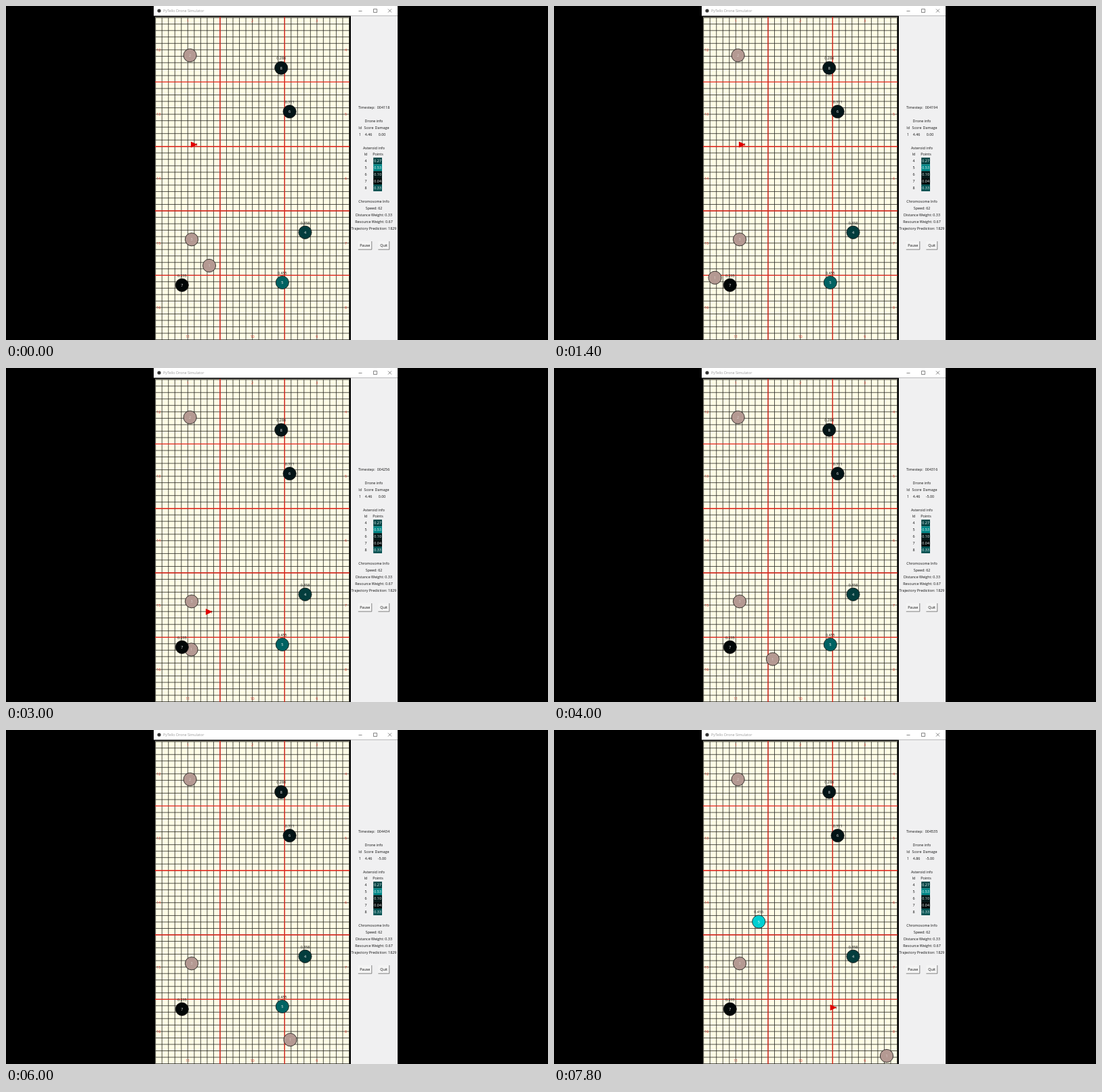
Write an HTML page that moves like this. It is 800 px wide and 494 px high and loops after 8000 ms.

```html
<!DOCTYPE html>
<html lang="en">
<head>
<meta charset="utf-8">
<title>Drone Simulator</title>
<style>
  html, body { margin: 0; width: 100%; height: 100%; overflow: hidden; background: #000; }
  svg { display: block; width: 100vw; height: 100vh; }
  text { font: 5.4px "Open Sans", "Noto Sans", sans-serif; }
</style>
</head>
<body>
<svg id="stage" viewBox="0 0 800 494"></svg>
<script>
const stage = document.getElementById('stage');
const LOOP = 8000, TICK = 200;
const LEFT = 220.7, TOP = 17.2, TILE = 95.27, CELL = TILE / 10;

function add(tag, attrs, parent = stage) {
  const el = document.createElementNS('http://www.w3.org/2000/svg', tag);
  for (const key in attrs) el.setAttribute(key, attrs[key]);
  parent.appendChild(el);
  return el;
}
const rect = (x, y, width, height, fill) => add('rect', { x, y, width, height, fill });
const path = (d, stroke, width) => add('path', { d, stroke, 'stroke-width': width, fill: 'none' });
function label(str, x, y, fill = '#111', anchor = 'middle', parent = stage) {
  const el = add('text', { x, y: y + 2, fill, 'text-anchor': anchor }, parent);
  el.textContent = str;
  return el;
}
const place = (el, x, y) => el.setAttribute('transform', `translate(${x.toFixed(2)} ${y.toFixed(2)})`);

// Window frame
rect(0, 0, 800, 494, '#000');
rect(218, 0, 360, 14.5, '#fff');
rect(509, 14.5, 69, 480, '#f0f0f1');
add('circle', { cx: 226, cy: 7, r: 2.6, fill: '#333' });
label('PyTello Drone Simulator', 232, 7, '#999', 'start');
path('M520.5 7.5h5M542.5 4.5h5v5h-5zM564 4.5l5 5m0-5l-5 5', '#555', 0.7);

// Board
rect(220.2, 16.4, 286.8, 478, '#fffde6');
function gridLines(step, cols, rows) {
  let d = '';
  for (let i = 0; i <= cols; i++) d += `M${LEFT + i * step} ${TOP}V494`;
  for (let j = 0; j <= rows; j++) d += `M${LEFT} ${TOP + j * step}H506.8`;
  return d;
}
path(gridLines(CELL, 30, 50), '#24241f', 0.8);
let red = '';
for (const i of [1, 2]) red += `M${LEFT + i * TILE} 16V494`;
for (const j of [1, 2, 3, 4]) red += `M220 ${TOP + j * TILE}H507`;
path(red, '#e8261c', 1.3);

const RED = '#e63c32';
for (let i = 0; i < 3; i++) {
  const x = LEFT + (i + 0.5) * TILE;
  label(1 + i, x, 22, RED);
  label(11 - i, x, 489, RED);
}
for (let j = 0; j < 5; j++) {
  const y = TOP + (j + 0.5) * TILE;
  label(12 + j, 225.3, y, RED);
  label(4 + j, 501.5, y, RED);
}

// Asteroids
function asteroid(id, x, y, fill, value) {
  const g = add('g', {});
  const disc = add('circle', { r: 9.6, fill, stroke: '#111', 'stroke-width': 0.8 }, g);
  label(id, 0, 0, value ? '#fff' : '#ddd0cc', 'middle', g);
  if (value) label(value, 0, -14.3, '#111', 'middle', g);
  place(g, x, y);
  return { g, disc };
}
const ROCK = '#b49992';
const rover = asteroid(1, 300, 384, ROCK);
asteroid(2, 271.6, 73, ROCK);
asteroid(3, 274, 345.3, ROCK);
asteroid(4, 441.5, 334.8, '#033d3d', '0.358');
const prize = asteroid(5, 407.8, 409, '#006262', '0.455');
asteroid(6, 418.6, 156.2, '#021416', '0.311');
asteroid(7, 259.8, 412.8, '#020707', '0.235');
asteroid(8, 406.2, 91.6, '#021416', '0.288');

// Drone
const drone = add('g', {});
add('path', { d: 'M-4.4-4.6L5.4 0L-4.4 4.6z', fill: '#e00000' }, drone);
label('1', 4.2, 0, '#300', 'middle', drone);

// Side panel
label('Timestep:', 520, 150.2, '#111', 'start');
const stepText = label('', 557, 150.2);
label('Drone info', 543, 170);
label('Id', 522.7, 180);
label('Score', 535.5, 180);
label('Damage', 555, 180);
label('1', 522.5, 189.8);
const scoreText = label('', 535, 189.8);
const damageText = label('', 555, 189.8);
label('Asteroid info', 543, 209.5);
label('Id', 531, 219.4);
label('Points', 549, 219.4);
[['0.27', '#044444'], ['0.53', '#008787'], ['0.10', '#001919'],
 ['0.04', '#000a0a'], ['0.33', '#045454']].forEach(([points, fill], i) => {
  const y = 229.3 + i * 9.93;
  label(4 + i, 531, y);
  rect(542.2, y - 5, 12.8, 10, fill);
  label(points, 548.7, y, '#fff');
});
['Chromosome Info', 'Speed: 62', 'Distance Weight: 0.33', 'Resource Weight: 0.67',
 'Trajectory Prediction: 1829'].forEach((line, i) => label(line, 543, 289 + i * 9.93));

function button(str, x, width) {
  rect(x, 348, width, 12.3, '#f4f4f4');
  path(`M${x} 360.2h${width}v-12.2`, '#666', 0.8);
  label(str, x + width / 2, 354);
}
button('Pause', 519.8, 20);
button('Quit', 549.4, 16.4);

// Motion
const COUNTER = [[0, 4118], [1400, 4194], [3000, 4256], [4000, 4316],
                 [5200, 4388], [6800, 4479], [7800, 4535]];
function stepAt(t) {
  let i = 1;
  while (t > COUNTER[i][0]) i++;
  const [t0, s0] = COUNTER[i - 1], [t1, s1] = COUNTER[i];
  return s0 + (s1 - s0) * (t - t0) / (t1 - t0);
}

// Reflects a travelled distance between two walls.
function bounce(dist, lo, hi) {
  const span = hi - lo, d = ((dist % (2 * span)) + 2 * span) % (2 * span);
  return lo + (d < span ? d : 2 * span - d);
}

const LAUNCH = 1800, CRASH = 3600, MINED = 7000;
function draw(t) {
  const step = stepAt(t), travelled = step - 4118;
  place(rover.g, bounce(0.8225 * travelled - 70, 230, 497), 384 + 0.235 * travelled);

  const mined = t >= MINED;
  const flight = Math.max(0, t - LAUNCH) / 1200;
  if (mined) place(drone, 412, 410.5);
  else place(drone, 277.3 + 22 * flight, 205 + 155.6 * flight);
  drone.setAttribute('visibility', t < CRASH || mined ? 'visible' : 'hidden');

  place(prize.g, mined ? 302.2 : 407.8, mined ? 283.5 : 409);
  prize.disc.setAttribute('fill', mined ? '#00cfd2' : '#006262');

  stepText.textContent = String(Math.round(step)).padStart(6, '0');
  scoreText.textContent = mined ? '4.86' : '4.46';
  damageText.textContent = t < CRASH ? '0.00' : '-5.00';
}

const start = performance.now();
function frame() {
  const t = (performance.now() - start) % LOOP;
  draw(Math.floor(t / TICK) * TICK);
  requestAnimationFrame(frame);
}
frame();
</script>
</body>
</html>
```
